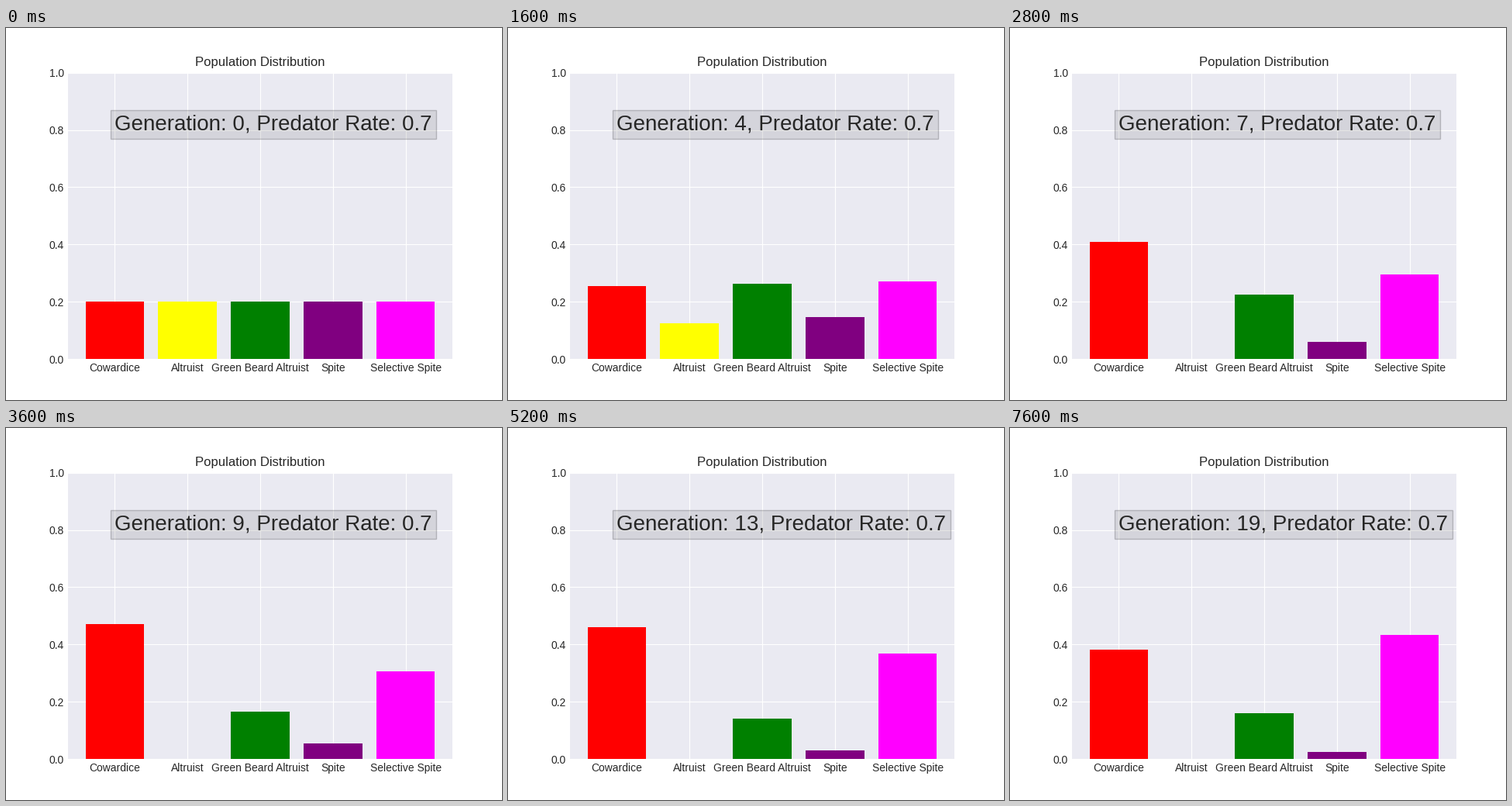
Recreate the animation shown at these times as a matplotlib script. Size 640x480 px, loop 8000 ms.

```python
import numpy as np
import matplotlib.pyplot as plt
from matplotlib.animation import FuncAnimation

INK = "0.15"
plt.rcParams.update({
    "font.family": "Liberation Sans",
    "text.color": INK,
    "xtick.color": INK,
    "ytick.color": INK,
    "axes.facecolor": "#EAEAF2",
    "axes.axisbelow": True,
    "axes.grid": True,
    "axes.linewidth": 0,
    "grid.color": "white",
    "grid.linewidth": 0.8,
    "xtick.major.size": 0,
    "ytick.major.size": 0,
})

GENERATIONS = 20
PREDATOR_RATE = 0.7

# Strategy: colour and turning points {generation: share}, linear in between
STRATEGIES = {
    "Cowardice": ("red", {0: .2, 2: .195, 5: .285, 8: .471, 9: .471,
                          13: .46, 17: .401, 19: .382}),
    "Altruist": ("yellow", {0: .2, 2: .146, 4: .125, 5: .02, 6: 0}),
    "Green Beard Altruist": ("green", {0: .2, 2: .22, 5: .285, 9: .166,
                                       13: .141, 17: .136, 19: .16}),
    "Spite": ("purple", {0: .2, 2: .195, 5: .122, 8: .028, 9: .055,
                         13: .03, 17: .047, 19: .025}),
    "Selective Spite": ("magenta", {0: .2, 2: .244, 5: .285, 9: .306,
                                    13: .369, 17: .417, 19: .433}),
}


def share(turns, generation):
    return np.interp(generation, list(turns), list(turns.values()))


fig, ax = plt.subplots(figsize=(6.4, 4.8), dpi=100, facecolor="white")
ax.set_title("Population Distribution")
ax.set_ylim(0, 1)
colors, paths = zip(*STRATEGIES.values())
positions = range(len(STRATEGIES))
bars = ax.bar(positions, [share(path, 0) for path in paths], color=colors)
ax.set_xticks(positions, list(STRATEGIES))
ax.set_xlim(-0.64, 4.64)
label = ax.text(0, 0.8, "", fontsize=20,
                bbox={"facecolor": "grey", "alpha": 0.2})


def update(generation):
    for bar, path in zip(bars, paths):
        bar.set_height(share(path, generation))
    label.set_text(f"Generation: {generation}, Predator Rate: {PREDATOR_RATE}")
    return [*bars, label]


anim = FuncAnimation(fig, update, frames=GENERATIONS, interval=400,
                     repeat=True, repeat_delay=0)
plt.show()
```
